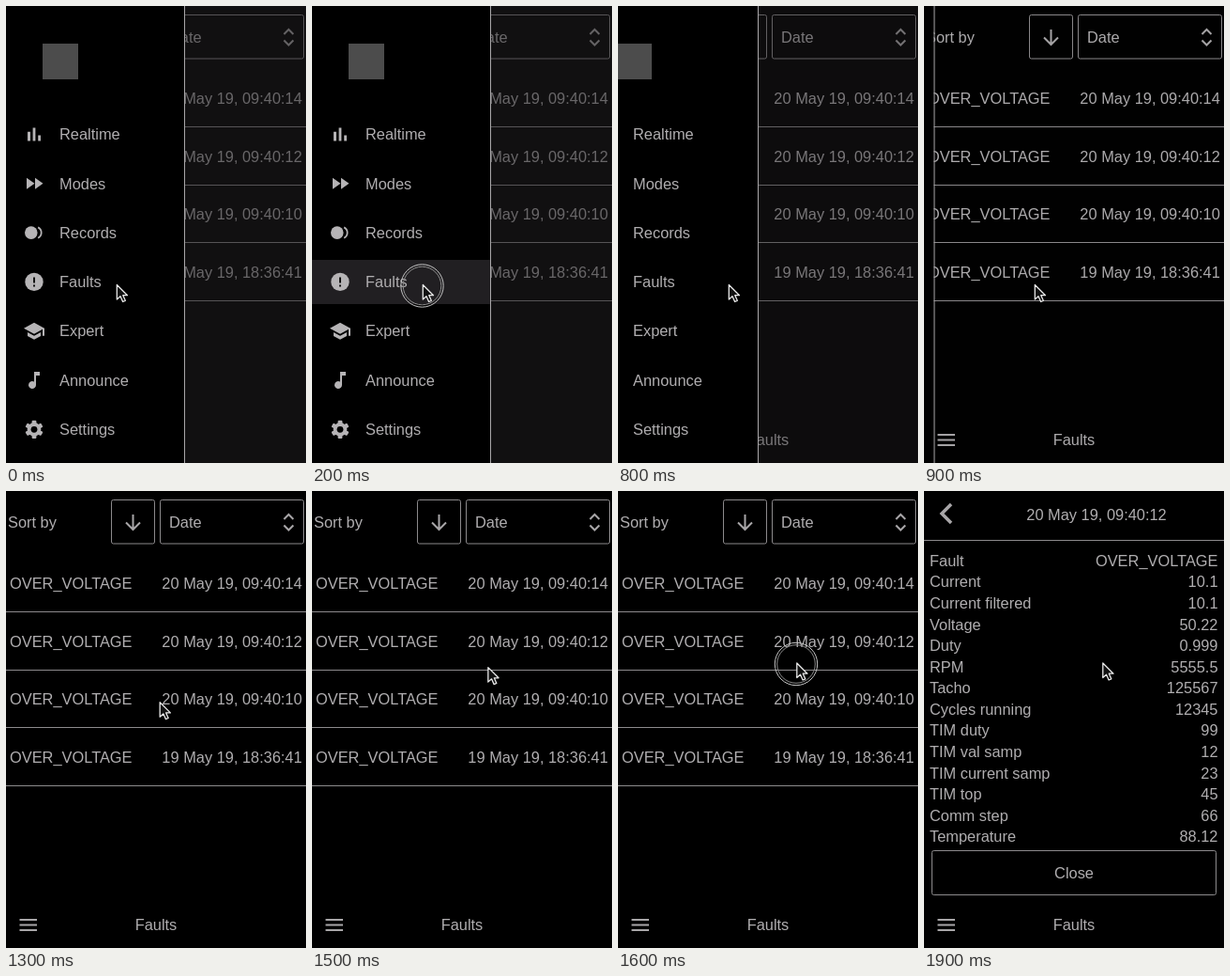
An HTML page for the animation above (2.7 s loop, 320 px wide and 486 px high).

```html
<!DOCTYPE html>
<html lang="en">
<head>
<meta charset="utf-8">
<title>Fault list</title>
<style>
  html, body { margin: 0; width: 100%; height: 100%; overflow: hidden; background: #000; }
  svg { display: block; width: 100vw; height: 100vh; }
  text { font: 16.4px "Liberation Sans", Arial, sans-serif; fill: #b0aeb0; white-space: pre; }
  .line { fill: none; stroke: #8c8a8c; stroke-width: 1; }
  .icon { fill: none; stroke: #a8a6a8; stroke-width: 2; }
  .glyph { fill: #b6b4b6; }
</style>
</head>
<body>
<svg viewBox="0 0 320 486">
  <rect width="320" height="486" fill="#000"/>
  <g id="list">
    <text x="2" y="38.8">Sort by</text>
    <rect class="line" x="112.5" y="9.5" width="46" height="46.5" rx="2"/>
    <path class="icon" d="M135.5 25V41M128 33.500L135.500 41L143 33.500"/>
    <rect class="line" x="164.500" y="9.500" width="153" height="46.500" rx="2"/>
    <text x="174" y="38.8">Date</text>
    <path class="icon" d="M296.500 30L301.500 25L306.500 30M296.500 36.500L301.500 41.500L306.500 36.500"/>
  </g>
  <g id="detail">
    <path class="icon" style="stroke-width:3.500" d="M29 14L19 24L29 34"/>
    <text x="184" y="30.500" text-anchor="middle">20 May 19, 09:40:12</text>
    <path class="line" d="M0 52.500H320"/>
    <rect class="line" x="8.500" y="382.500" width="303" height="47" rx="2"/>
    <text x="160" y="412" text-anchor="middle">Close</text>
  </g>
  <path class="icon" d="M14.500 456H33M14.500 461.500H33M14.500 467H33"/>
  <text x="160" y="467.300" text-anchor="middle">Faults</text>
  <rect id="shade" width="320" height="486" fill="#222023"/>
  <g id="drawer">
    <rect width="190" height="486" fill="#000"/>
    <rect id="active" y="270" width="190" height="47" fill="#211f22"/>
    <rect x="39" y="40" width="38" height="38" fill="#4c4c4c"/>
    <g id="menu"></g>
    <path class="line" d="M190.500 0V486" style="stroke:#aaa8aa"/>
  </g>
  <g id="ring" fill="none">
    <circle r="22.700" stroke="#c4c4c4"/>
    <circle r="20.300" stroke="#8c8c8c"/>
  </g>
  <path id="cursor" d="M0 0V15.500L3.700 12.200L6.300 18L9 16.800L6.500 11.200H11.200Z"
    fill="#111" stroke="#e8e8e8" stroke-width="1.300" stroke-linejoin="round"/>
</svg>
<script>
const LOOP = 2700, STEP = 100, DRAWER = 190;
const $ = id => document.getElementById(id);

function add(parent, tag, attrs, text) {
  const node = document.createElementNS("http://www.w3.org/2000/svg", tag);
  for (const key in attrs) node.setAttribute(key, attrs[key]);
  if (text) node.textContent = text;
  parent.appendChild(node);
  return node;
}

const faults = ["20 May 19, 09:40:14", "20 May 19, 09:40:12", "20 May 19, 09:40:10", "19 May 19, 18:36:41"];
faults.forEach((date, i) => {
  const y = 104.4 + i * 61.5;
  add($("list"), "text", { x: 4, y }, "OVER_VOLTAGE");
  add($("list"), "text", { x: 315.8, y, "text-anchor": "end" }, date);
  add($("list"), "path", { class: "line", d: `M0 ${Math.floor(128.4 + i * 61.6) + 0.5}H320` });
});

const details = [
  ["Fault", "OVER_VOLTAGE"], ["Current", "10.1"], ["Current filtered", "10.1"],
  ["Voltage", "50.22"], ["Duty", "0.999"], ["RPM", "5555.5"], ["Tacho", "125567"],
  ["Cycles running", "12345"], ["TIM duty", "99"], ["TIM val samp", "12"],
  ["TIM current samp", "23"], ["TIM top", "45"], ["Comm step", "66"], ["Temperature", "88.12"]
];
details.forEach(([label, value], i) => {
  const y = 79.8 + i * 22.57;
  add($("detail"), "text", { x: 6, y }, label);
  add($("detail"), "text", { x: 313.5, y, "text-anchor": "end" }, value);
});

// Icons sit on a 24-unit grid centred on 12,12.
const teeth = [0, 60, 120]
  .map(a => `<rect x="9.6" y="2.4" width="4.800" height="19.200" rx="1" transform="rotate(${a} 12 12)"/>`)
  .join("");
const menu = [
  ["Realtime", '<path d="M5 9.200h3V19H5zM10.600 5h2.800v14h-2.800zM16.200 13H19v6h-2.800z"/>'],
  ["Modes", '<path d="M4 18l8.500-6L4 6zM13 6v12l8.500-6z"/>'],
  ["Records", '<circle cx="8.800" cy="12" r="6.800"/><path d="M16.200 6.300a6.400 6.400 0 0 1 0 11.400" fill="none" stroke="#b6b4b6" stroke-width="1.800"/>'],
  ["Faults", '<circle cx="12" cy="12" r="9.700"/><path d="M11 7h2v6h-2zM11 15h2v2h-2z" fill="#111"/>'],
  ["Expert", '<path d="M5 13.180v4L12 21l7-3.820v-4L12 17zM12 3L1 9l11 6 9-4.910V17h2V9z"/>'],
  ["Announce", '<path d="M12 3v10.550A4 4 0 1 0 14 17V7h4V3z"/>'],
  ["Settings", `<circle cx="12" cy="12" r="7.300"/>${teeth}<circle cx="12" cy="12" r="3.400" fill="#000"/>`]
];
menu.forEach(([label, icon], i) => {
  const y = 136.5 + i * 52.3;
  add($("menu"), "g", { class: "glyph", transform: `translate(18 ${y - 12})` }).innerHTML = icon;
  add($("menu"), "text", { x: 57, y: y + 5.7 }, label);
});

const show = (id, on) => $(id).setAttribute("display", on ? "inline" : "none");
const move = (id, x, y) => $(id).setAttribute("transform", `translate(${x} ${y})`);
const easeInOut = p => p < 0.5 ? 2 * p * p : 1 - 2 * (1 - p) ** 2;

function drawerShift(t) {
  if (t < 800) return 0;
  if (t < 900) return 41;
  return t < 1000 ? 179.5 : DRAWER + 2;
}

function render(time) {
  const t = Math.floor((time % LOOP) / STEP) * STEP;
  const shift = drawerShift(t);
  const p = easeInOut(Math.min(1, Math.max(0, (t - 900) / 700)));
  const x = 118.3 + 72.5 * p, y = 296.5 - 113.5 * p;
  const pressed = t >= 200 && t < 800;

  show("list", t < 1900);
  show("detail", t >= 1900);
  show("active", pressed);
  show("ring", pressed || (t >= 1600 && t < 1900));
  move("drawer", -shift, 0);
  $("shade").setAttribute("opacity", 0.5 * Math.max(0, 1 - shift / DRAWER));
  move("cursor", x, y);
  move("ring", x - 0.8, y + 1);
}

const start = performance.now();
function tick() {
  render(performance.now() - start);
  requestAnimationFrame(tick);
}
tick();
</script>
</body>
</html>
```
